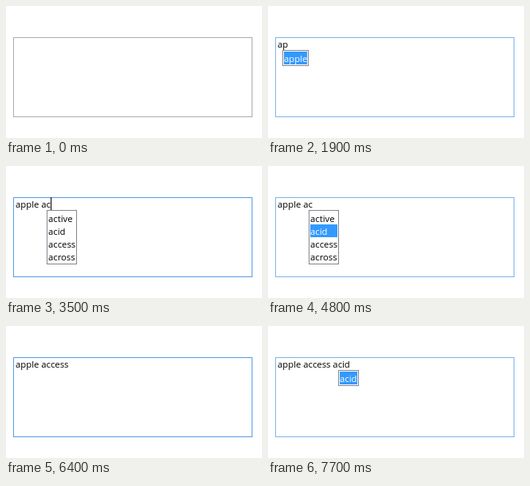
Recreate the animation shown at these times as an HTML page. Size 321 px wide and 165 px high, loop 8000 ms.

```html
<!DOCTYPE html>
<html lang="en">
<head>
<meta charset="utf-8">
<title>Autocomplete text box</title>
<style>
  html, body { margin: 0; width: 100%; height: 100%; overflow: hidden; background: #fff; }
  svg { display: block; width: 321px; height: 165px; }
  text { font: 11.3px "Open Sans", "Noto Sans", sans-serif; fill: #000; white-space: pre; }
  rect { shape-rendering: crispEdges; }
</style>
</head>
<body>
<svg viewBox="0 0 321 165">
  <rect id="box" x="9.5" y="39.5" width="299" height="99" fill="#fff"/>
  <text id="typed" x="12" y="52"></text>
  <rect id="caret" y="39" width="1" height="17"/>
  <g id="popup"></g>
</svg>
<script>
const LOOP = 8000;
const ROW = 16;
const IDLE = '#abadb3', HOVER = '#7eb4ea', FADE = '#6aa9e8', FOCUS = '#569de5';

const all = ['apple', 'able', 'also', 'active', 'acid', 'access'];
const ac = ['active', 'acid', 'access', 'across'];

const list = (x, w, items, selected = -1) => ({ x, w, items, selected });

// time, border, typed text, caret x (null = hidden), popup
const steps = [
  [0, IDLE, '', null],
  [400, HOVER, '', null],
  [600, FOCUS, '', 12],
  [1100, FOCUS, '', null],
  [1300, FOCUS, 'a', 18, list(18, 38, all)],
  [1500, FOCUS, 'ap', 25, list(18, 33, ['apple'])],
  [1900, HOVER, 'ap', null, list(18, 33, ['apple'], 0)],
  [2300, FOCUS, 'apple', 41],
  [2700, FOCUS, 'apple ', 44],
  [3200, FOCUS, 'apple a', 50, list(51, 38, all)],
  [3500, FOCUS, 'apple ac', 56, list(51, 38, ac)],
  [4000, FOCUS, 'apple ac', null, list(51, 38, ac)],
  [4400, FADE, 'apple ac', null, list(51, 38, ac, 0)],
  [4500, HOVER, 'apple ac', null, list(51, 38, ac, 0)],
  [4800, HOVER, 'apple ac', null, list(51, 38, ac, 1)],
  [5100, HOVER, 'apple ac', null, list(51, 38, ac, 2)],
  [5400, FOCUS, 'apple access', 78],
  [5900, FOCUS, 'apple access ', 81],
  [6400, FOCUS, 'apple access ', null],
  [6500, FOCUS, 'apple access a', 87, list(88, 38, all, 5)],
  [6900, FOCUS, 'apple access ac', 93, list(88, 38, ac, 2)],
  [7100, FOCUS, 'apple access aci', 96, list(88, 26, ['acid'])],
  [7300, FOCUS, 'apple access acid', 103, list(88, 26, ['acid'])],
  [7700, HOVER, 'apple access acid', null, list(88, 26, ['acid'], 0)]
];

const [box, typed, caret, popup] =
  ['box', 'typed', 'caret', 'popup'].map(id => document.getElementById(id));

function add(tag, attrs, content = '') {
  const el = document.createElementNS('http://www.w3.org/2000/svg', tag);
  for (const key in attrs) el.setAttribute(key, attrs[key]);
  el.textContent = content;
  popup.append(el);
}

function drawPopup({ x, w, items, selected }) {
  add('rect', {
    x: x + 0.5, y: 55.5, width: w - 1, height: items.length * ROW + 3,
    fill: '#fff', stroke: '#828790'
  });
  items.forEach((word, i) => {
    const y = 57 + i * ROW;
    const on = i === selected;
    if (on) add('rect', { x: x + 2, y, width: w - 4, height: ROW, fill: '#3399ff' });
    add('text', { x: x + 2, y: y + 13, style: on ? 'fill:#fff' : '' }, word);
  });
}

function show([, border, text, caretX, words]) {
  box.setAttribute('stroke', border);
  typed.textContent = text;
  caret.setAttribute('visibility', caretX === null ? 'hidden' : 'visible');
  caret.setAttribute('x', caretX ?? 0);
  popup.replaceChildren();
  if (words) drawPopup(words);
}

let start, current;

function tick(now) {
  start ??= now;
  const t = (now - start) % LOOP;
  const step = steps.findLast(s => s[0] <= t) || steps[0];
  if (step !== current) show(current = step);
  requestAnimationFrame(tick);
}

show(current = steps[0]);
requestAnimationFrame(tick);
</script>
</body>
</html>
```
